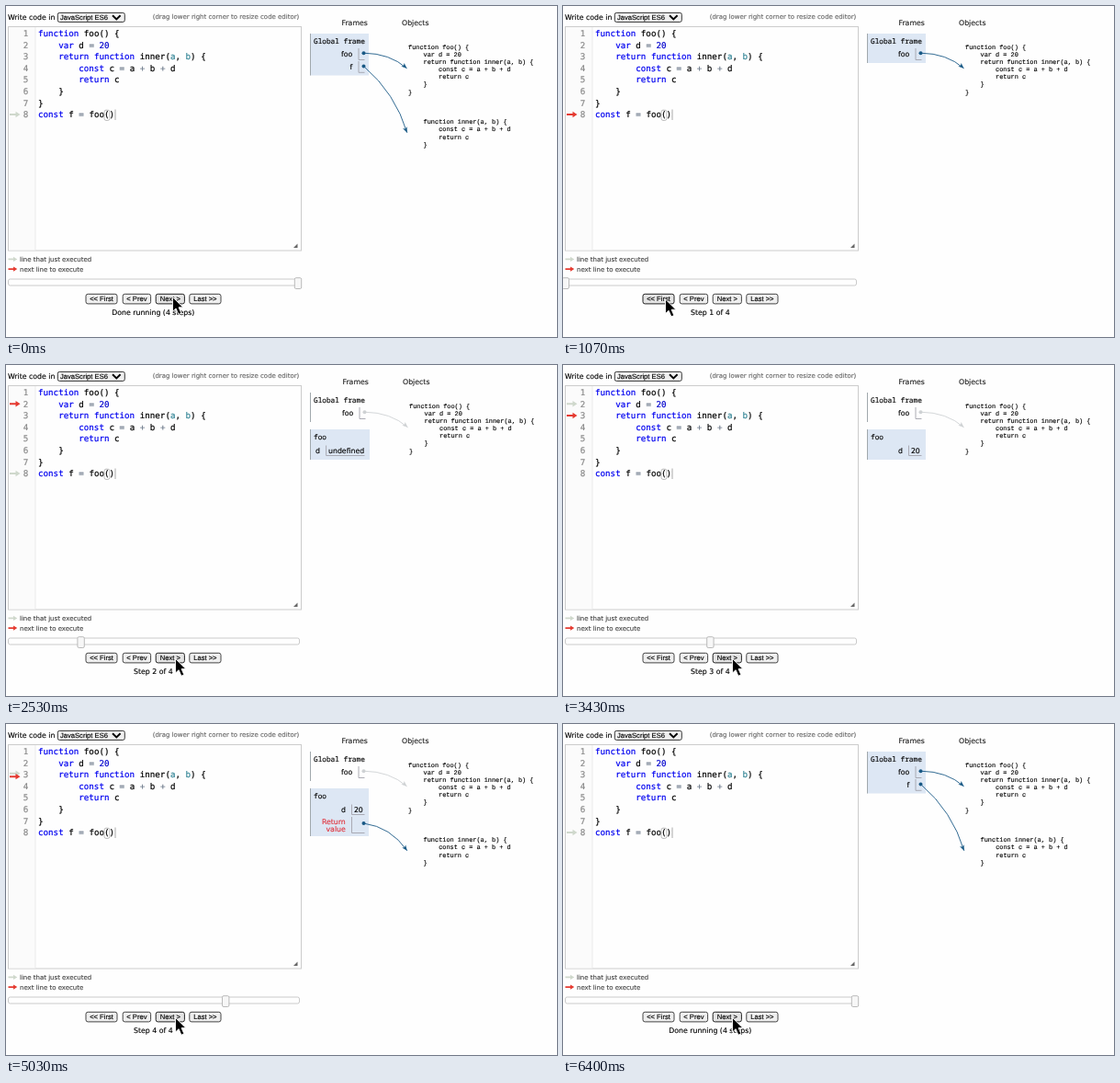
Write an HTML page that moves like this. It is 600 px wide and 360 px high and loops after 6.43 s.

```html
<!DOCTYPE html>
<html lang="en">
<head>
<meta charset="utf-8">
<title>Code stepper</title>
<style>
  html, body { margin: 0; width: 600px; height: 360px; overflow: hidden; background: #fff; }
  svg { display: block; }
  text { white-space: pre; text-rendering: geometricPrecision; stroke-width: .14px; }
  .ui { font-family: "DejaVu Sans", Verdana, sans-serif; font-size: 7.8px; }
  .small { font-size: 6.97px; }
  .control { font-family: "Liberation Sans", Arial, sans-serif; font-size: 7.6px; }
  .editor { font-family: "DejaVu Sans Mono", Menlo, monospace; font-size: 9.2px; stroke-width: .2px; }
  .header { font-family: "Noto Sans Mono", "DejaVu Sans Mono", monospace; font-size: 7.75px; }
  .object { font-family: "Liberation Mono", Courier, monospace; font-size: 6.9px; }
</style>
</head>
<body>
<svg id="stage" width="600" height="360" viewBox="0 0 600 360"></svg>
<script>
const LOOP = 6430;
const stage = document.getElementById('stage');

function add(parent, tag, attrs = {}, content = '') {
  const node = document.createElementNS('http://www.w3.org/2000/svg', tag);
  for (const key in attrs) node.setAttribute(key, attrs[key]);
  node.textContent = content;
  return parent.appendChild(node);
}
const group = (parent = stage) => add(parent, 'g');
const rect = (parent, x, y, width, height, attrs) =>
  add(parent, 'rect', { x, y, width, height, ...attrs });
const path = (parent, d, attrs) => add(parent, 'path', { d, fill: 'none', ...attrs });
// A hairline stroke in the text colour gives the slightly heavy desktop rendering.
const ink = color => ({ fill: color, stroke: color });
const label = (parent, x, y, content, cls = 'ui', attrs = {}) =>
  add(parent, 'text', { x, y, class: cls, ...ink('#000'), ...attrs }, content);
const END = { 'text-anchor': 'end' };
const MIDDLE = { 'text-anchor': 'middle' };

const CODE = `function foo() {
    var d = 20
    return function inner(a, b) {
        const c = a + b + d
        return c
    }
}
const f = foo()`.split('\n');
const lineY = n => 29.7 + (n - 1) * 12.62;

function tokenColor(token) {
  if (/^(function|var|return|const)$/.test(token)) return '#0000f0';
  if (/^\d+$/.test(token)) return '#0000cd';
  if (/^[=+]$/.test(token)) return '#687687';
  return '#000';
}

function drawCode() {
  CODE.forEach((line, i) => {
    const y = lineY(i + 1) + 3.2;
    label(stage, 24.3, y, i + 1, 'editor', { ...END, ...ink('#888') });
    const text = label(stage, 35, y, '', 'editor');
    for (const token of line.split(/(\w+|[=+])/)) {
      const isParam = i === 2 && /^[ab]$/.test(token);
      add(text, 'tspan', ink(isParam ? '#318495' : tokenColor(token)), token);
    }
  });
  rect(stage, 107, 113.2, 5.9, 11.2, { rx: 2, fill: 'none', stroke: '#aaa', 'stroke-width': .8 });
  path(stage, 'M119 112.5V124', { stroke: '#999', 'stroke-width': .8 });
}

function codeArrow(parent, x, y, color, scale = 1) {
  return path(parent, 'M0-1H6.5V-3.2L11.5 0L6.5 3.2V1H0Z',
    { fill: color, transform: `translate(${x} ${y}) scale(${scale})` });
}
const RED = '#e53a30', PALE = '#cfd8cc';

function drawShell() {
  rect(stage, 0, 0, 600, 360, { fill: '#fefefe' });
  label(stage, 2, 15.3, 'Write code in');
  rect(stage, 56.3, 7.4, 73, 10, { rx: 2, fill: '#efefef', stroke: '#333' });
  label(stage, 59, 15.2, 'JavaScript ES6', 'control');
  path(stage, 'M116 10.3L120.3 14.5L124.6 10.3', { stroke: '#000', 'stroke-width': 1.9 });
  label(stage, 319.3, 14.4, '(drag lower right corner to resize code editor)', 'ui small',
    { ...END, ...ink('#666') });
  rect(stage, 2.5, 22.5, 319, 243.5, { fill: '#fefefe', stroke: '#ccc' });
  rect(stage, 3, 23, 29, 242.5, { fill: '#fbfbfb' });
  path(stage, 'M32 23V265.5', { stroke: '#e4e4e4', 'stroke-width': .7 });
  path(stage, 'M317.5 258.5V263H313Z', { fill: '#666' });
  drawCode();
  codeArrow(stage, 2.5, 275.4, PALE, .85);
  codeArrow(stage, 2.5, 286.1, RED, .85);
  label(stage, 15, 278, 'line that just executed', 'ui small', ink('#444'));
  label(stage, 15, 288.7, 'next line to execute', 'ui small', ink('#444'));
  rect(stage, 2.5, 297, 317, 7, { rx: 2, fill: '#fefefe', stroke: '#c4c4c4', 'stroke-width': .9 });
}

function drawButton([x, width, caption]) {
  const box = rect(stage, x, 313.3, width, 10.6, { rx: 2.2 });
  label(stage, x + width / 2, 321.4, caption, 'control', MIDDLE);
  return { x, width, box };
}

function connector(parent, x, y, curve, tipX, tipY, angle, color) {
  add(parent, 'circle', { cx: x, cy: y, r: 2, fill: color });
  path(parent, `M${x} ${y}Q${curve} ${tipX} ${tipY}`, { stroke: color, 'stroke-width': .9 });
  path(parent, 'M0 0L-6-2.5L-4.6 0L-6 2.5Z',
    { fill: color, transform: `translate(${tipX} ${tipY}) rotate(${angle})` });
}
const LINK = '#1a5a86', FADED = '#cfd2d4';

function frameBox(parent, y, height, width, title, active) {
  if (active) rect(parent, 331, y, width, height, { fill: '#dde7f4' });
  path(parent, `M331.5 ${y}v${height}`, { stroke: '#a0a8ac', 'stroke-width': 1 });
  label(parent, 335, y + 10.8, title, 'header');
}
function cell(parent, x, top, bottom, right) {
  path(parent, `M${x} ${top}V${bottom}H${right}`, { stroke: '#a3a3ac', 'stroke-width': .9 });
}
function objectCode(parent, x, y, lines) {
  lines.forEach((line, i) => label(parent, x, y + i * 8.17, line, 'object'));
}

function drawInner(parent, x, y, curve, angle) {
  connector(parent, x, y, curve, 436.8, 137.8, angle, LINK);
  objectCode(parent, 454.6, 128.3, [CODE[2].trim().slice(7), '    const c = a + b + d', '    return c', '}']);
}

function drawMemory(step) {
  const g = group();
  const shift = step === 2 ? 1 : 0;
  const globalActive = step === 1 || step === 5;
  label(g, 365.5 + shift, 20.8, 'Frames', 'ui', ink('#222'));
  label(g, 431 + shift, 20.8, 'Objects', 'ui', ink('#222'));
  objectCode(g, 438 + shift, 46.5, CODE.slice(0, 7));

  frameBox(g, 30, step === 5 ? 45.5 : 32, 64, 'Global frame', globalActive);
  label(g, 377.3 + shift, 55, 'foo', 'ui', END);
  cell(g, 384 + shift, 46, 58.5, 390.5 + shift);
  connector(g, 389.5 + shift, 51.2, `${418 + shift} 51.5`, 436.5 + shift, 67.8, 41,
    globalActive ? LINK : FADED);

  if (step === 5) {
    label(g, 377.3, 68.7, 'f', 'ui', END);
    cell(g, 384, 60, 72.3, 390.5);
    drawInner(g, 389.5, 65.4, '424 95', 66);
  } else if (step > 1) {
    frameBox(g, 70, step === 4 ? 52 : 33, 64 + shift, 'foo', true);
    const cellX = step === 2 ? 348.6 : 376.5;
    label(g, cellX - 6.6, 96.2, 'd', 'ui', END);
    cell(g, cellX, 87.5, 98.5, 390.5);
    label(g, cellX + 2.4, 96.2, step === 2 ? 'undefined' : '20');
    if (step === 4) {
      label(g, 369.8, 108.8, 'Return', 'ui', { ...END, ...ink('#e0303a') });
      label(g, 369.8, 117.1, 'value', 'ui', { ...END, ...ink('#e0303a') });
      cell(g, 376.5, 101, 118.5, 390.5);
      drawInner(g, 389.5, 108, '419 112', 53);
    }
  }
  return g;
}

function drawMarkers([previous, next]) {
  const g = group();
  const same = previous === next;
  if (previous) codeArrow(g, 4, lineY(previous) - (same ? 1.2 : 0), PALE);
  if (next) codeArrow(g, 4, lineY(next) + (same ? 2.2 : 0), RED);
  return g;
}

drawShell();
const handle = rect(stage, 0, 295.7, 7.4, 11.8, { rx: 1.5, fill: '#f7f7f7', stroke: '#b4b4b4', 'stroke-width': .9 });
const buttons = [
  [87, 34, '<< First'], [127.2, 30.4, '< Prev'], [163.2, 31.2, 'Next >'], [199.8, 34.2, 'Last >>']
].map(drawButton);
const status = label(stage, 160.3, 335.6, '', 'ui', MIDDLE);

// Lines just executed and about to execute, for each step.
const views = [[0, 8], [8, 2], [2, 3], [3, 3], [8, 0]].map((lines, i) => {
  const g = drawMemory(i + 1);
  g.appendChild(drawMarkers(lines));
  return g;
});
const pointer = path(stage, 'M0 0V15.6L3.6 12.3L6.4 18.8L9.4 17.5L6.6 11.2H11.4Z',
  { fill: '#000', stroke: '#fff', 'stroke-width': .9 });

// Each entry: time, step shown from then on.
const STEPS = [[0, 5], [860, 1], [2340, 2], [3390, 3], [4430, 4], [5490, 5]];
// Each entry: time, pointer x, pointer y.
const POINTER = [[-90, 184.5, 316.5], [650, 111.5, 319], [1350, 111.5, 319], [1820, 184.5, 319.4], [LOOP, 184.5, 319.4]];

function pointerAt(t) {
  const i = POINTER.findIndex(key => key[0] > t);
  const [t0, x0, y0] = POINTER[i - 1], [t1, x1, y1] = POINTER[i];
  const p = (t - t0) / (t1 - t0), eased = p * p * (3 - 2 * p);
  return [x0 + (x1 - x0) * eased, y0 + (y1 - y0) * eased];
}

function render(t) {
  const step = STEPS.filter(entry => entry[0] <= t).pop()[1];
  const [x, y] = pointerAt(t);
  views.forEach((view, i) => view.setAttribute('visibility', i + 1 === step ? 'visible' : 'hidden'));
  handle.setAttribute('x', -.9 + (step - 1) * 78.8);
  status.textContent = step === 5 ? 'Done running (4 steps)' : `Step ${step} of 4`;
  for (const { x: left, width, box } of buttons) {
    const hovered = x >= left && x <= left + width;
    box.setAttribute('fill', hovered ? '#e4e4e4' : '#efefef');
    box.setAttribute('stroke', hovered ? '#222' : '#444');
  }
  pointer.setAttribute('transform', `translate(${x} ${y})`);
}

const start = performance.now();
function tick() {
  render((performance.now() - start) % LOOP);
  requestAnimationFrame(tick);
}
tick();
</script>
</body>
</html>
```
